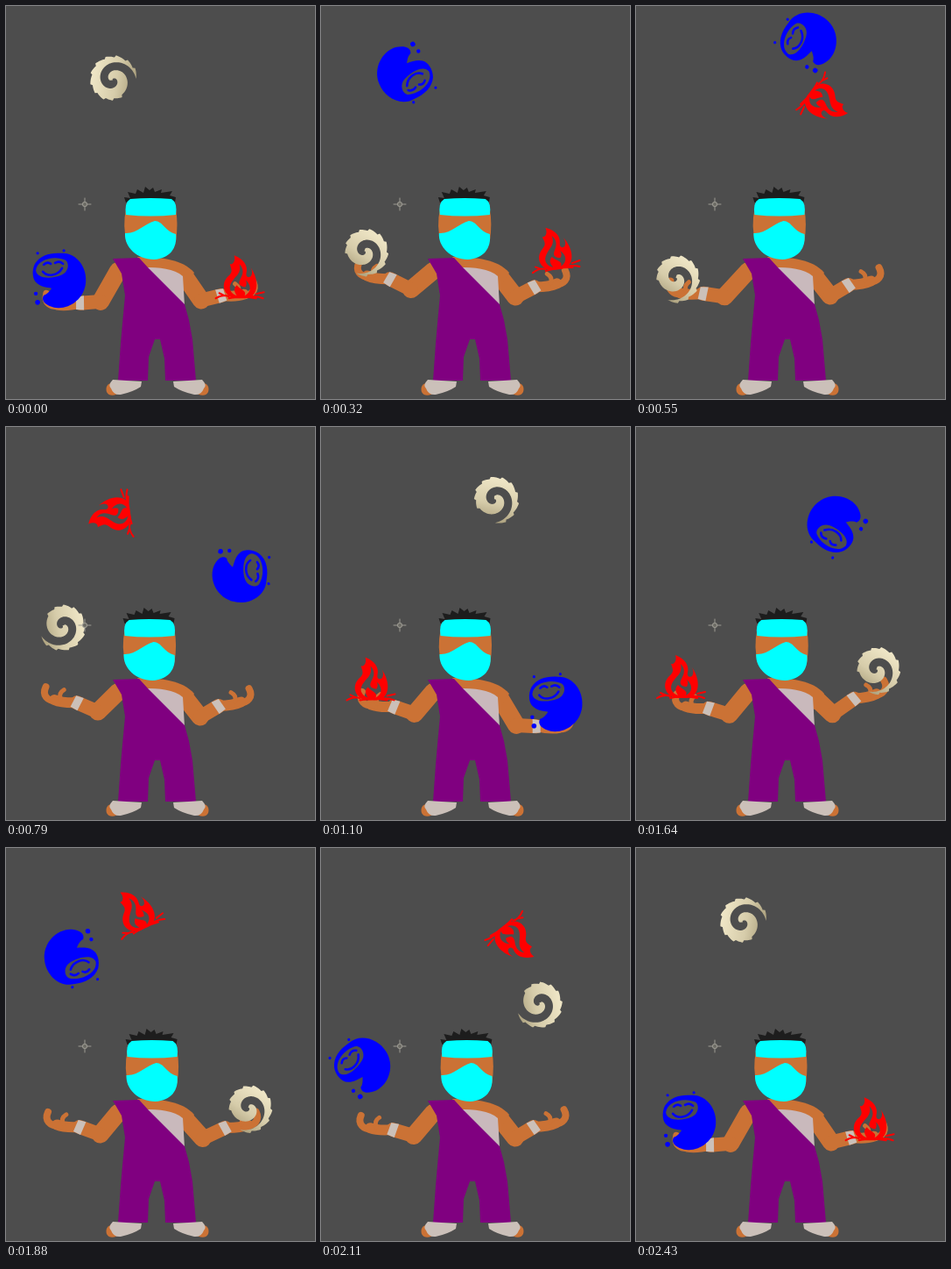
These frames come from a looping animation (353x448 px, 2510 ms). An HTML page with a canvas:

```html
<!DOCTYPE html>
<html lang="en">
<head>
<meta charset="utf-8">
<title>Elemental juggler</title>
<style>
html, body { margin: 0; width: 100%; height: 100%; overflow: hidden; background: #4d4d4d; }
canvas { display: block; }
</style>
</head>
<body>
<canvas id="stage" width="353" height="448"></canvas>
<script>
const ctx = document.getElementById('stage').getContext('2d');
const SKIN = '#cb7235', CLOTH = '#cbc0b9', CYAN = '#00ffff', PURPLE = '#800080';
const LOOP = 2510, STEPS = 32;
const CYCLE = STEPS - 1; // the last pose equals the first

const linear = u => u;
const sine = u => Math.sin(u * Math.PI / 2);
const smooth = u => u * u * (3 - 2 * u);
const smoother = u => u ** 3 * (10 - 15 * u + 6 * u * u);
const wrap = t => (t % CYCLE + CYCLE) % CYCLE;
const mix = (a, b, u) => a + (b - a) * u;

// Every prop is thrown once from each hand: up and down are steps, peak is the top of the arc.
const props = [
  { draw: air, level: 270, dip: 40, angle: 105, weight: 0, throws: [
    { up: 9.4, down: 19.2, from: 42, to: 274, peak: 82, turns: 2, ease: sine },
    { up: 24.9, down: 33.8, from: 277, to: 51, peak: 55, turns: 1, ease: linear }] },
  { draw: fire, level: 288, dip: 36, angle: 0, weight: 0, throws: [
    { up: 3.9, down: 13.5, from: 267, to: 58, peak: 85, turns: -2, ease: smooth },
    { up: 20, down: 28.6, from: 52, to: 268, peak: 72, turns: 2, ease: smooth }] },
  { draw: water, level: 290, dip: 30, angle: 0, weight: 10, throws: [
    { up: 1, down: 11.4, from: 64, to: 272, peak: 32, turns: -2, ease: smoother },
    { up: 17.1, down: 26.5, from: 264, to: 48, peak: 79, turns: 2, ease: smoother }] }
];

function locate({ level, dip, angle, throws }, t) {
  for (const [i, flight] of throws.entries()) {
    const u = wrap(t - flight.up) / (flight.down - flight.up);
    if (u < 1) return {
      x: mix(flight.from, flight.to, flight.ease(u)),
      y: mix(level, flight.peak, 4 * u * (1 - u)),
      angle: angle + 360 * flight.turns * u
    };
    const next = throws[1 - i];
    const v = wrap(t - flight.down) / wrap(next.up - flight.down);
    if (v < 1) return {
      x: mix(flight.to, next.from, v),
      y: level + dip * Math.sin(Math.PI * v ** 1.5),
      angle, held: flight.to > 173 ? 1 : -1
    };
  }
}

// side: -1 on the left of the stage, 1 on the right
function wristAt(side, t) {
  for (const prop of props) {
    const p = locate(prop, t);
    if (p.held === side) {
      const reach = side < 0 ? 80 + (p.x - 52) / 2 : 248 + (p.x - 272) / 2;
      return [reach, 323 + .6 * (p.y - 300) + prop.weight];
    }
  }
  return [side < 0 ? 84 : 243, 318];
}
function softWrist(side, t) {
  const near = [-.7, 0, .7].map(d => wristAt(side, t + d));
  return [0, 1].map(k => near.reduce((sum, p) => sum + p[k] / 3, 0));
}

function shape(d, color) {
  ctx.fillStyle = color;
  ctx.fill(new Path2D(d), 'evenodd');
}
function line(d, color, width) {
  ctx.strokeStyle = color;
  ctx.lineWidth = width;
  ctx.stroke(new Path2D(d));
}
function dot(x, y, r, color) {
  ctx.fillStyle = color;
  ctx.beginPath();
  ctx.arc(x, y, r, 0, 7);
  ctx.fill();
}

function swirlPath() {
  const path = new Path2D(), N = 150;
  const put = (s, r) => {
    const a = (5 - 540 * s) * Math.PI / 180;
    path.lineTo(r * Math.cos(a), r * Math.sin(a));
  };
  for (let i = 0; i <= N; i++) {
    const s = i / N, tooth = s < .55 ? s * 20 % 1 * 2.6 : 0;
    put(s, 26.5 - 23 * s * s + tooth);
  }
  for (let i = N; i >= 0; i--) put(i / N, 26.5 * (1 - i / N) ** 1.6);
  path.closePath();
  return path;
}
const swirl = swirlPath();

function air() {
  const g = ctx.createLinearGradient(-22, -8, 26, 8);
  g.addColorStop(0, '#eee5c5');
  g.addColorStop(.55, '#d6ccaa');
  g.addColorStop(1, '#a99e7b');
  ctx.fillStyle = g;
  ctx.fill(swirl);
}

function water() {
  const blue = '#0000ff';
  shape('M2-30C20-31 32-13 30 4C28 23 10 35-6 32C-14 30-22 25-18 18C-14 17-11 13-9 10' +
    'C-15 9-22 8-26 4C-31 0-32-10-28-18C-22-28-10-31 2-30Z' +
    'M-27-10C-26-24-4-28 7-22C12-18 10-8 2-5C-8-1-25 0-27-10Z', blue);
  line('M-19-9C-14-3-2-4 3-13M-18-17Q-14-21-10-18M-5-19Q0-22 4-18', blue, 2.6);
  dot(-25, -30, 1.6, blue);
  dot(5, -33, 1.6, blue);
  dot(-27, 16, 2.2, blue);
  dot(-25, 26, 2.8, blue);
}

function fire() {
  const red = '#ff0000';
  shape('M-8 21C-20 16-22 4-14-4C-8-9-10-12-12-18C-8-17-5-22-7-28C4-24 9-16 7-8C6-4 9-2 12-4' +
    'C14-7 14-10 12-14C19-4 22 10 14 18L6 21Z' +
    'M-8 16C-17 8-8 0-3-6C0-10 0-14-1-18C5-12 3-6 0-1C-4 6 2 8 6 8C8 4 7 2 6 0' +
    'C13 6 13 14 5 18C8 12 0 11-4 6C-8 10-7 13-4 18Z', red);
  line('M-28 21Q-19 16-13 19M-24 15l6 3M10 19Q19 18 26 21M18 16l9-2M-13 21Q0 18 18 21', red, 2);
}

function place(prop, t) {
  const { x, y, angle } = locate(prop, t);
  ctx.save();
  ctx.translate(x, y);
  ctx.rotate(angle * Math.PI / 180);
  prop.draw();
  ctx.restore();
}

function arm(side, t) {
  const [wx, wy] = softWrist(side, t);
  const left = side < 0;
  const ex = left ? 104 + .9 * (wx - 80) : 223 + .4 * (wx - 246);
  const ey = left ? 324 + .5 * (wy - 313) : 331 + .4 * (wy - 319);
  line(`M${left ? '128 302' : '204 308'}L${ex} ${ey}`, SKIN, 20);
  line(`M${ex} ${ey}L${wx} ${wy}`, SKIN, 16);
  ctx.save();
  ctx.translate(wx, wy);
  ctx.scale(side, 1);
  const slope = Math.atan2(wy - ey, (wx - ex) * side);
  ctx.rotate(slope * .4);
  line('M0 0C10 2 18 3 26 1', SKIN, 12);
  line('M22 2C34 4 41-2 38-12', SKIN, 8);
  line('M19-1Q23-7 17-12', SKIN, 5);
  ctx.rotate(slope * .6);
  shape('M-5-8L4-7L5 7L-4 8Z', CLOTH);
  ctx.restore();
}

function body() {
  shape('M150 286C178 286 202 289 215 304L204 322L160 300Z', SKIN);
  shape('M158 298C175 298 192 299 202 308L204 341Z', '#c9b9bc');
  shape('M122 288L152 287L162 298L204 340L209 358L213 380L217 427H182L181 402L176 380H170L163 400L162 427H128' +
    'L131 385L133 362L136 330L132 305Z', PURPLE);
  for (const side of [-1, 1]) {
    ctx.save();
    ctx.translate(173, 0);
    ctx.scale(side, 1);
    shape('M48 430C56 428 60 434 58 440C55 446 47 444 43 440Z', SKIN);
    shape('M18 428Q36 427 51 426Q57 432 53 436Q50 444 42 443Q28 440 19 434Z', CLOTH);
    ctx.restore();
  }
}

function head(dx) {
  ctx.save();
  ctx.translate(dx, 0);
  shape('M137 224L135 218L142 219L139 212L148 214L150 209L157 213L159 206L164 210L168 207L170 212L178 209' +
    'L177 213L190 211L187 216L194 218L193 224Z', '#1d1d1d');
  shape('M137 232H194Q197 248 194 268L165 282L138 270Q133 250 137 232Z', SKIN);
  shape('M142 220Q165 218 189 220Q196 224 194 238Q165 241 137 238Q135 224 142 220Z', CYAN);
  shape('M136 259C150 260 158 248 170 245C179 245 182 257 194 260C196 276 187 288 169 289C150 289 135 275 136 259Z', CYAN);
  ctx.restore();
}

function crosshair() {
  line('M83 226h4M93 226h4M90 219v4M90 229v4', '#9d9b93', 1);
  dot(90, 226, 3, '#9d9b93');
  dot(90, 226, 2, '#6b6a64');
}

function render(t) {
  ctx.fillStyle = '#4d4d4d';
  ctx.fillRect(0, 0, 353, 448);
  ctx.lineCap = ctx.lineJoin = 'round';
  arm(-1, t);
  arm(1, t);
  body();
  head(-1.6 * Math.sin(2 * Math.PI * t / CYCLE));
  for (const prop of props) place(prop, t);
  crosshair();
}

const origin = performance.now();
function tick() {
  const now = performance.now() - origin + 4;
  render(Math.floor(now / LOOP * STEPS) % STEPS % CYCLE);
  requestAnimationFrame(tick);
}
tick();
</script>
</body>
</html>
```
